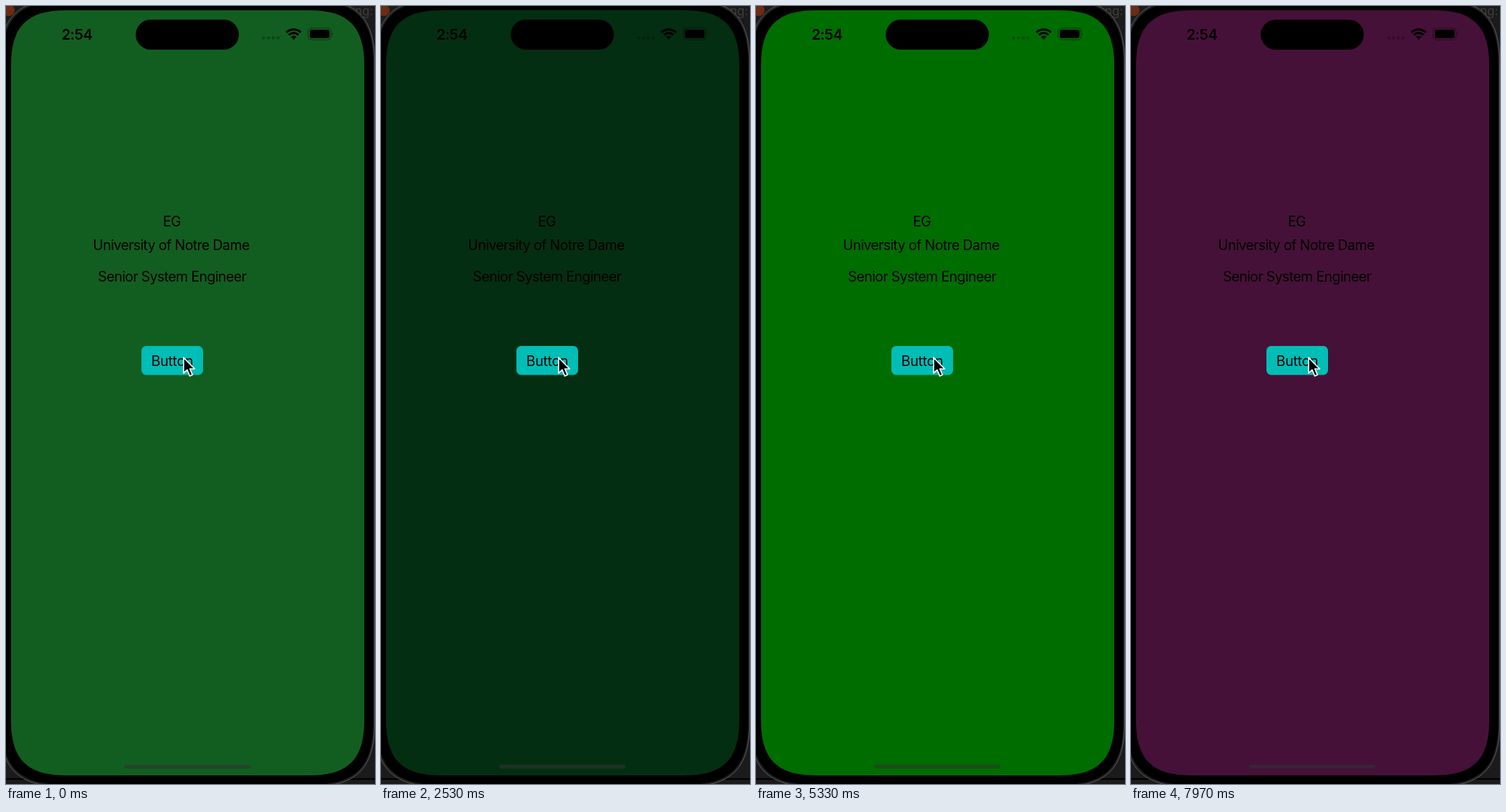
These frames come from a looping animation (515x1087 px, 8000 ms). An HTML page:

```html
<!DOCTYPE html>
<html lang="en">
<head>
<meta charset="utf-8">
<title>Colour button</title>
<style>
  html, body { margin: 0; width: 100%; height: 100%; overflow: hidden; background: #1b1b1b; }
  svg { display: block; width: 515px; height: 1087px; }
  text { font: 19.5px Inter, Roboto, sans-serif; letter-spacing: -.6px; text-anchor: middle; }
  #clock { font-size: 20.3px; font-weight: 600; letter-spacing: -.5px; }
  #label { letter-spacing: -.25px; }
  #title { font-size: 17px; letter-spacing: 0; text-anchor: start; fill: #3d3d3d; }
</style>
</head>
<body>
<svg viewBox="0 0 515 1087">
  <!-- desktop behind the phone -->
  <circle cx="4" cy="6" r="8" fill="#6b2c14"/>
  <text id="title" x="487" y="13">ng:</text>
  <path d="M0 1080H515" stroke="#000" stroke-width="2"/>

  <!-- phone -->
  <path id="frame" fill="#202020" stroke="#5c5c5c"/>
  <path id="bezel"/>
  <path id="screen"/>
  <rect x="181" y="19" width="144" height="42" rx="21"/>

  <!-- status bar -->
  <text id="clock" x="99" y="47">2:54</text>
  <g opacity=".25">
    <circle cx="359.5" cy="44.5" r="2.2"/>
    <circle cx="366.2" cy="44.5" r="2.2"/>
    <circle cx="372.9" cy="44.5" r="2.2"/>
    <circle cx="379.6" cy="44.5" r="2.2"/>
  </g>
  <g transform="translate(401.5 47)" fill="none" stroke="#000" stroke-width="3.1">
    <path d="M-10.1 -10.1A14.3 14.3 0 0 1 10.1 -10.1M-6.5 -6.5A9.2 9.2 0 0 1 6.5 -6.5"/>
    <path d="M0 0L-3.9 -3.9A5.5 5.5 0 0 1 3.9 -3.9Z" fill="#000" stroke="none"/>
  </g>
  <g opacity=".35">
    <rect x="421.7" y="30.7" width="32" height="16.6" rx="5" fill="none" stroke="#000" stroke-width="1.3"/>
    <path d="M455.2 36.5Q457.6 39 455.2 41.5Z"/>
  </g>
  <rect x="424" y="33" width="27.5" height="12" rx="3"/>

  <!-- card -->
  <text x="231.5" y="307.5">EG</text>
  <text x="230.5" y="341">University of Notre Dame</text>
  <text x="231.8" y="384.5">Senior System Engineer</text>
  <rect x="189" y="475" width="86" height="40.4" rx="6.5" fill="#00bdb6"/>
  <text id="label" x="232" y="502.5">Button</text>
  <path d="M247.8 491.2V513L252.8 508.4L256.5 517L260.3 515.3L256.7 507H263.4Z"
        stroke="#fff" stroke-width="1.7" stroke-linejoin="round"/>
  <rect x="165" y="1060" width="176" height="5.5" rx="2.75" fill="#323232" opacity=".58"/>
</svg>
<script>
  const LOOP = 8000;
  const get = id => document.getElementById(id);
  const screen = get('screen');

  // Continuous-curvature corners: e is the corner's reach, c its control offset.
  function squircle(l, t, r, b, e) {
    const c = e * .29;
    return `M${l} ${t + e}C${l} ${t + c} ${l + c} ${t} ${l + e} ${t}` +
      `H${r - e}C${r - c} ${t} ${r} ${t + c} ${r} ${t + e}` +
      `V${b - e}C${r} ${b - c} ${r - c} ${b} ${r - e} ${b}` +
      `H${l + e}C${l + c} ${b} ${l} ${b - c} ${l} ${b - e}Z`;
  }
  get('frame').setAttribute('d', squircle(-8.5, -9.5, 514.5, 1090.5, 88));
  get('bezel').setAttribute('d', squircle(-6, -7, 512.5, 1088, 86));
  screen.setAttribute('d', squircle(7, 6, 500, 1075, 77));

  // Time in ms, then the screen colour at that time.
  const shades = [
    [0, 18, 94, 32],
    [1100, 113, 0, 51],
    [2530, 4, 46, 17],
    [3600, 53, 21, 0],
    [5330, 0, 109, 0],
    [6630, 0, 33, 59],
    [7970, 70, 17, 56]
  ];

  function shadeAt(t) {
    const i = shades.findIndex(s => s[0] > t);
    if (i < 0) return shades[shades.length - 1].slice(1);
    const [t0, ...from] = shades[i - 1], [t1, ...to] = shades[i];
    const k = (t - t0) / (t1 - t0);
    return from.map((v, j) => Math.round(v + (to[j] - v) * k));
  }

  const start = performance.now();
  function draw() {
    const t = (performance.now() - start) % LOOP;
    screen.setAttribute('fill', `rgb(${shadeAt(t)})`);
    requestAnimationFrame(draw);
  }
  draw();
</script>
</body>
</html>
```
